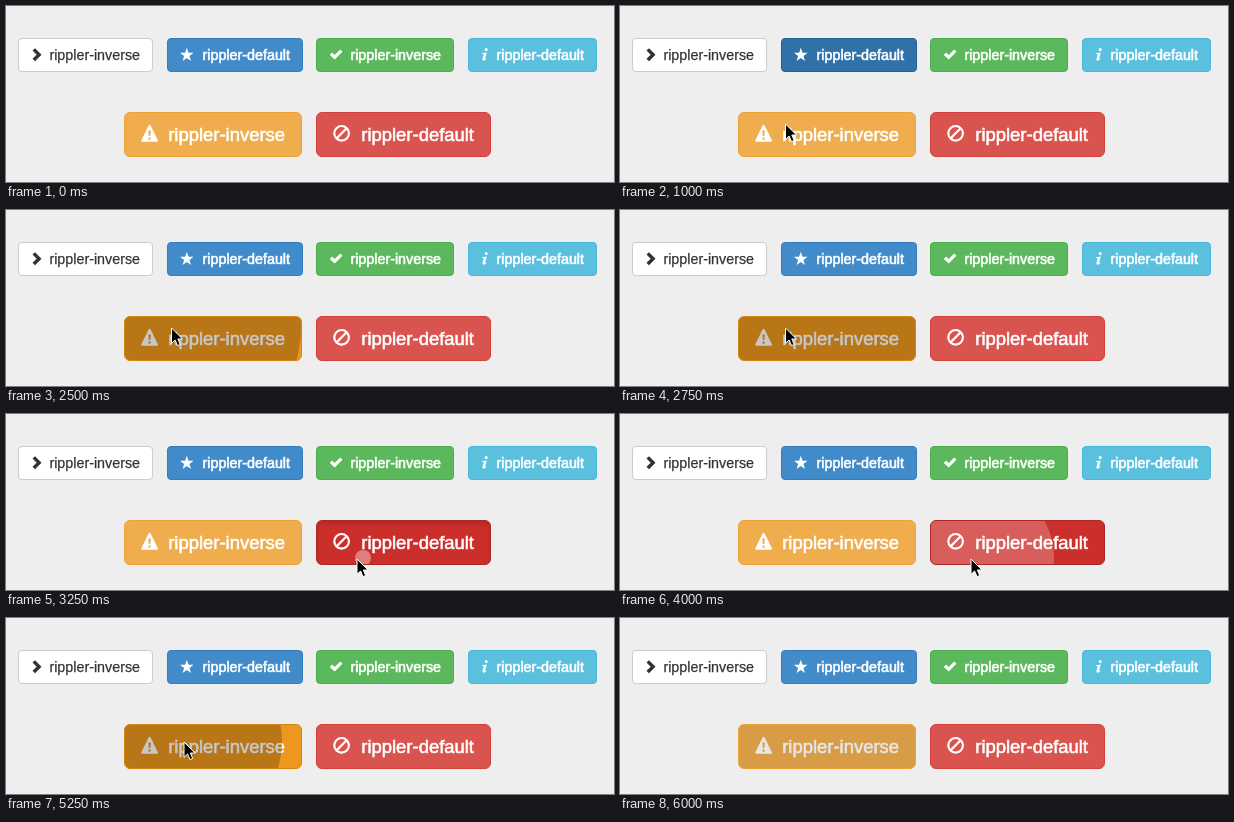
These frames come from a looping animation (608x176 px, 6250 ms). An HTML page:

```html
<!DOCTYPE html>
<html lang="en">
<head>
<meta charset="utf-8">
<title>Button ripples</title>
<style>
html, body { margin: 0; width: 100%; height: 100%; overflow: hidden; background: #eee; }
.btn {
  position: absolute; top: 32px; height: 34px; box-sizing: border-box; overflow: hidden;
  border: 1px solid; border-radius: 4px; color: #fff; fill: #fff;
  font: 14.3px/32px "Liberation Sans", Arial, sans-serif; white-space: nowrap;
  -webkit-text-stroke: .6px;
}
.btn.large { top: 106px; height: 45px; border-radius: 6px; font-size: 18.45px; line-height: 43px; }
.btn span, .btn svg, .ripple, #cursor { position: absolute; }
.btn span { top: 0; right: 12px; }
.btn svg { left: 12px; top: 9px; width: 14px; height: 14px; overflow: visible; }
.large span { right: 16px; }
.large svg { left: 16px; top: 12px; width: 18px; height: 18px; }
.plain { background: #fff; border-color: #ccc; color: #333; fill: #333; -webkit-text-stroke: .25px; }
.primary { background: #428bca; border-color: #357ebd; }
.success { background: #5cb85c; border-color: #4cae4c; }
.info { background: #5bc0de; border-color: #46b8da; }
.warning { background: #f0ad4e; border-color: #eea236; }
.danger { background: #d9534f; border-color: #d43f3a; }
.primary.hover { background: #3071a9; border-color: #285e8e; }
.warning.hover { background: #ed971e; border-color: #d58512; }
.danger.hover { background: #cb2f2b; border-color: #ac2925; }
.down { box-shadow: inset 0 3px 5px rgba(0, 0, 0, .125); }
.ripple { border-radius: 50%; }
#cursor { left: 0; top: 0; width: 14px; height: 20px; overflow: visible; }
</style>
</head>
<body>
<svg id="cursor"><path d="M1 1V16.3L4.6 13 7 18.6 9.7 17.5 7.3 12H12Z" stroke="#fff" stroke-linejoin="round"/></svg>
<script>
const LOOP = 6250, TICK = 250;

// Icons are drawn in a 14 unit box.
const icons = {
  chevron: '<path d="M1.5 2.6 4 .3 10.5 6.7 4 13.2 1.5 10.8 5.7 6.7Z"/>',
  star: '<path d="M6.8-.3 8.5 4.7 13.6 4.8 9.5 7.9 11 12.9 6.8 9.9 2.6 12.9 4.1 7.9 0 4.8 5.1 4.7Z"/>',
  check: '<path d="M.8 6.9 3.1 4.6 5.7 7.1 11.2 1.5 13.5 3.8 5.7 11.5Z"/>',
  info: '<circle cx="5.2" cy="1.5" r="1.5"/><path d="M1 5.2 5.8 4.4 4.1 10.5Q4.2 11 5.8 10 4.5 13 2.3 12.7 1 12.5 1.6 10.5L2.8 6.2 1 6Z"/>',
  warning: '<path fill-rule="evenodd" d="M5.9.4Q6.7-.6 7.5.4L13.2 12Q13.5 13 12.5 13H.9Q-.1 13 .2 12ZM5.7 4.2h2l-.4 4.4h-1.2ZM5.9 9.8h1.6v1.6h-1.6Z"/>',
  ban: '<g fill="none" stroke="#fff" stroke-width="1.7"><circle cx="6.7" cy="6.5" r="5.7"/><path d="M2.8 10.4 10.6 2.6"/></g>'
};

function addButton(type, x, width, icon, style) {
  const el = document.createElement('div');
  el.className = 'btn ' + type;
  el.style.cssText = `left:${x}px;width:${width}px`;
  el.innerHTML = `<svg viewBox="0 0 14 14">${icons[icon]}</svg><span>rippler-${style}</span>
    <div class="ripple" style="background:${style === 'inverse' ? '#000' : '#fff'}"></div>`;
  cursor.before(el);
  return el;
}

addButton('plain', 12, 135, 'chevron', 'inverse');
const blue = addButton('primary', 161, 136, 'star', 'default');
addButton('success', 310, 138, 'check', 'inverse');
addButton('info', 462, 129, 'info', 'default');
const orange = addButton('warning large', 118, 178, 'warning', 'inverse');
const red = addButton('danger large', 310, 175, 'ban', 'default');

// The pointer glides to its resting place while one button is hovered.
const visits = [
  { button: blue, start: 250, end: 2000, from: [173, 85], to: [164.5, 117], glide: 700 },
  { button: orange, start: 2000, end: 3000, to: [164.5, 117], press: 2000, release: 2000 },
  { button: red, start: 3000, end: 4500, to: [350, 144], press: 3250, release: 3814 },
  { button: orange, start: 4500, end: 5500, from: [180, 77], to: [177, 123], glide: 250, press: 5000, release: 5001 }
];

const clamp = v => Math.min(1, Math.max(0, v));
const smooth = p => p * p * p * (p * (6 * p - 15) + 10);
const easeOut = p => 1 - (1 - p) ** 3;

function movePointer({ start, from, to, glide = 1 }, t) {
  const p = smooth(clamp((t - start) / glide));
  const [x, y] = to.map((v, i) => from ? from[i] + (v - from[i]) * p : v);
  cursor.style.transform = `translate(${x}px,${y}px)`;
}

// A small dot while pressed; on release it spreads, then fades.
function drawRipple({ button, to: [x, y], release }, t) {
  const age = Math.max(0, t - release);
  const r = 8 + 120 * easeOut(clamp(age / 750));
  const opacity = (.22 + .16 * Math.exp(-age / 50)) * clamp((1200 - age) / 450);
  Object.assign(button.lastChild.style, {
    left: x + 7 - r - button.offsetLeft - 1 + 'px',
    top: y - r - button.offsetTop - 1 + 'px',
    width: 2 * r + 'px', height: 2 * r + 'px', opacity
  });
}

function draw(t) {
  for (const button of [blue, orange, red]) {
    button.classList.remove('hover', 'down');
    button.lastChild.style.opacity = 0;
  }
  cursor.style.display = 'none';
  for (const visit of visits) {
    if (t >= visit.start && t < visit.end) {
      cursor.style.display = 'block';
      movePointer(visit, t);
      visit.button.classList.add('hover');
      visit.button.classList.toggle('down', t >= visit.press && t < visit.release);
    }
    if (t >= visit.press) drawRipple(visit, t);
  }
}

function loop() {
  const t = performance.now() % LOOP;
  draw(t - t % TICK);
  requestAnimationFrame(loop);
}
loop();
</script>
</body>
</html>
```
